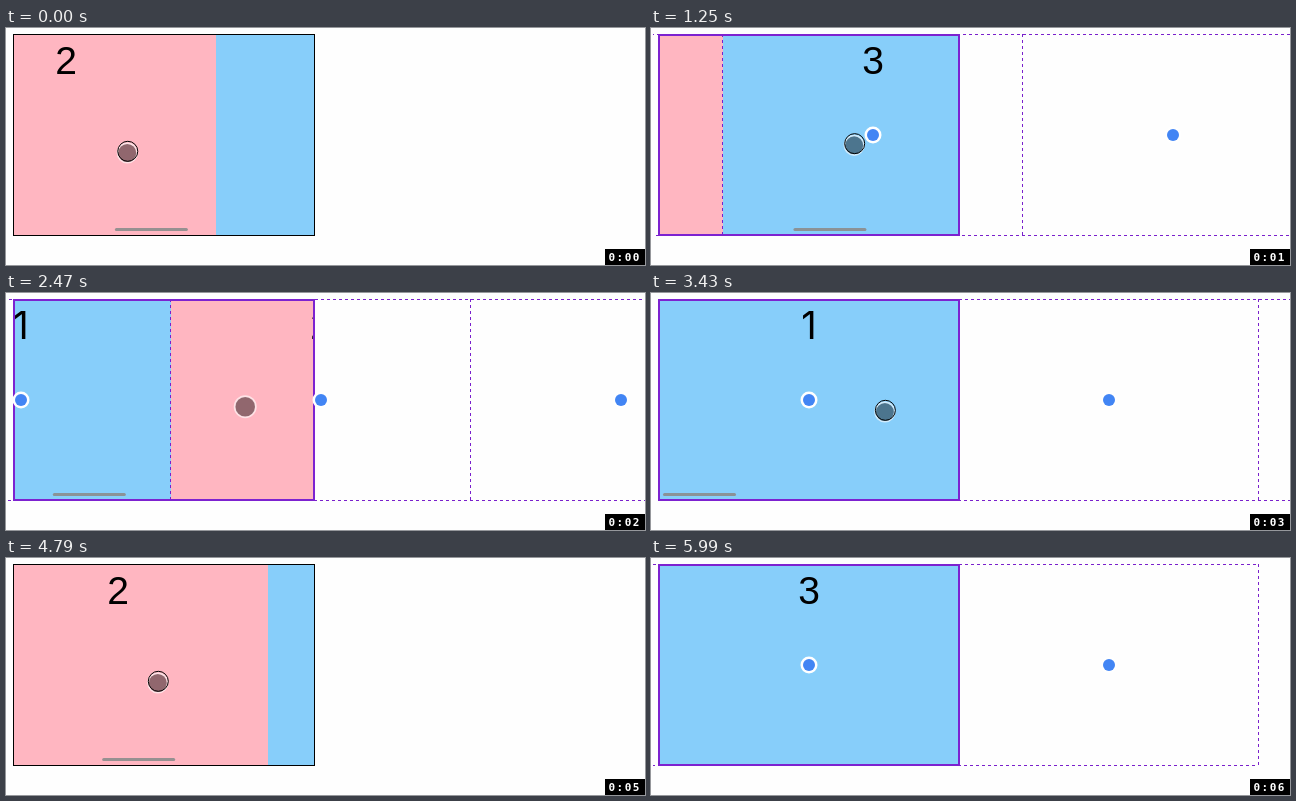
An HTML page for the animation above (6.28 s loop, 639x237 px).

```html
<!DOCTYPE html>
<html lang="en">
<head>
<meta charset="utf-8">
<title>Scroll snapping</title>
<style>
html, body { margin: 0; width: 100%; height: 100%; overflow: hidden; background: #fefefe; }
svg { display: block; }
.label { font: 39px "Liberation Sans", Arial, sans-serif; text-anchor: middle; }
.label.one { font: 38px Inter, sans-serif; }
.clock { font: bold 11px "DejaVu Sans Mono", monospace; letter-spacing: 1.5px; fill: #fff; }
.dashed { fill: none; stroke: #7a20cc; stroke-dasharray: 3 3; }
</style>
</head>
<body>
<svg width="639" height="237" viewBox="0 0 639 237">
  <defs>
    <clipPath id="port"><rect x="8" y="7" width="300" height="200"/></clipPath>
    <clipPath id="view"><rect x="2" y="0" width="637" height="237"/></clipPath>
  </defs>
  <rect x="7.5" y="6.5" width="301" height="201" fill="none" stroke="#000"/>
  <g clip-path="url(#port)"><g id="pages"></g></g>
  <rect id="thumb" y="200" width="73" height="3" rx="1.5" fill="#8c8c8c" fill-opacity=".9"/>
  <g id="overlay">
    <g clip-path="url(#view)"><g id="areas"></g></g>
    <rect x="8" y="7" width="300" height="200" fill="none" stroke="#7d22d0" stroke-width="2"/>
    <g id="dots"></g>
  </g>
  <g id="touch">
    <g id="finger">
      <circle r="10.5" fill="none" stroke="#fff" stroke-opacity=".6" stroke-width="2"/>
      <circle r="9.8" fill="#000" fill-opacity=".43"/>
    </g>
    <circle id="ring" cx=".5" cy="-.7" r="10" fill="none" stroke="#000"/>
  </g>
  <rect x="599" y="221" width="40" height="16"/>
  <text id="clock" class="clock" x="602.5" y="233"></text>
</svg>
<script>
const LOOP = 6280, PAGE = 300, SECOND = 930, SETTLE = 540;
const $ = id => document.getElementById(id);

const add = (parent, name, attrs, text = "") => {
  const node = document.createElementNS("http://www.w3.org/2000/svg", name);
  for (const key in attrs) node.setAttribute(key, attrs[key]);
  node.textContent = text;
  $(parent).append(node);
};

for (let i = 0; i < 4; i++) {
  const x = i * PAGE, mid = x + PAGE / 2;
  add("pages", "rect", { x, y: 7, width: PAGE, height: 200, fill: i % 2 ? "#ffb6c1" : "#87cefa" });
  add("pages", "text", { x: mid, y: 46, class: i ? "label" : "label one" }, i + 1);
  add("dots", "circle", { cx: mid, cy: 107, r: 8.5, fill: "#fff" });
  add("dots", "circle", { cx: mid, cy: 107, r: 6, fill: "#4285f4" });
  add("areas", "path", { class: "dashed", d: `M${x} 6.5h300M${x - 1} 207.5h300M${x + 299.5} 6v201` });
}

// Each swipe drags a page, then the scroller snaps to the neighbour.
const swipes = [
  { down: -405, up: 90, page: 1, from: [219.5, 124], to: [113, 124] },
  { down: 760, up: 1525, page: 2, from: [139.5, 123.5], to: [228.5, 113.5] },
  { down: 2180, up: 2311, page: 1, from: [228.5, 113.5], to: [239.5, 113.5] },
  { down: 3425, up: 3680, page: 0, from: [234, 118], to: [150, 119] },
  { down: 4500, up: 4930, page: 1, from: [198, 124], to: [137.5, 124] }
];
const exit = { down: 6180, from: [577, 256] };

const clamp = u => Math.max(0, Math.min(1, u));
const mix = (a, b, u) => a + (b - a) * u;
const glide = u => (1 - Math.cos(Math.PI * clamp(u))) / 2;
const move = (a, b, t, t0, t1) => a.map((v, i) => mix(v, b[i], glide((t - t0) / (t1 - t0))));
const show = (id, on) => $(id).setAttribute("visibility", on ? "inherit" : "hidden");

function stateAt(t) {
  const index = swipes.findLastIndex(s => s.down <= t);
  const { down, up, page, from, to } = swipes[index];
  const next = swipes[index + 1] || exit;
  const pressed = t < up;
  const dragged = move(from, to, t, down, up);
  const finger = pressed ? dragged : move(to, next.from, t, up, next.down);
  const forward = to[0] < from[0];
  const goal = (page + (forward ? 1 : -1)) * PAGE;
  const rest = (1 - clamp((t - up) / SETTLE)) ** 2;
  const scroll = mix(goal, page * PAGE + from[0] - dragged[0], rest);
  const hideAt = forward ? down + 30 : up + 200;
  return { pressed, finger, scroll: Math.round(scroll), inspected: t < hideAt || t >= up + SETTLE };
}

function draw(t) {
  const { pressed, finger, scroll, inspected } = stateAt(t);
  for (const id of ["pages", "areas", "dots"])
    $(id).setAttribute("transform", `translate(${8 - scroll})`);
  $("thumb").setAttribute("x", 12 + scroll * 73 / PAGE);
  $("thumb").setAttribute("opacity", clamp((5690 - t) / 130));
  show("overlay", inspected);
  show("touch", t < 5980);
  show("ring", pressed);
  $("touch").setAttribute("transform", `translate(${finger})`);
  $("finger").setAttribute("transform", pressed ? "translate(0 1) scale(.92)" : "");
  $("clock").textContent = "0:0" + Math.floor(t / SECOND);
}

const start = performance.now();
function tick() {
  draw((performance.now() - start) % LOOP);
  requestAnimationFrame(tick);
}
tick();
</script>
</body>
</html>
```
